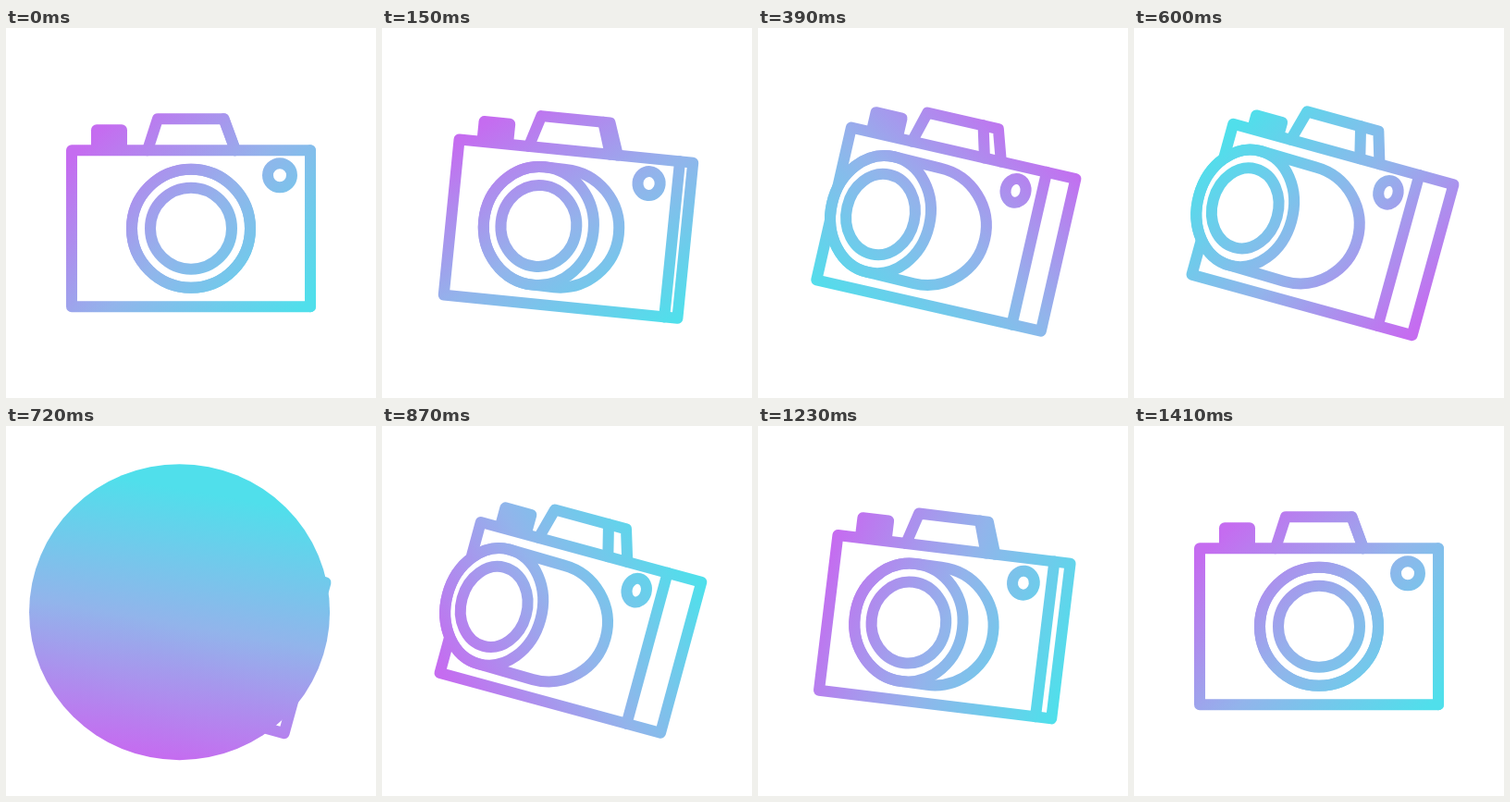
These frames come from a looping animation (400 by 400 pixels, 3470 ms). An HTML page with a canvas:

```html
<!DOCTYPE html>
<html>
<head>
<meta charset="utf-8">
<style>
html, body { margin: 0; width: 100%; height: 100%; overflow: hidden; background: #fff; }
canvas { display: block; width: 400px; height: 400px; }
</style>
</head>
<body>
<canvas id="stage" width="400" height="400"></canvas>
<script>
const ctx = document.getElementById('stage').getContext('2d');
const LOOP = 3470, STEP = 30, END = 1410;
const RAD = Math.PI / 180, TAU = Math.PI * 2;
const mix = (a, b, k) => a + (b - a) * k;
const clamp = x => Math.min(1, Math.max(0, x));

// [time, direction of the cyan end in degrees]
const SPIN = [[0, 45], [240, 75], [600, 225], [720, 280], [870, 330], [1110, 365], [1410, 405]];

// Smooth curve through the key points
function spinAt(t) {
  const slope = i => {
    const a = SPIN[Math.max(0, i - 1)], b = SPIN[Math.min(SPIN.length - 1, i + 1)];
    return (b[1] - a[1]) / (b[0] - a[0]);
  };
  let i = 0;
  while (i < SPIN.length - 2 && t > SPIN[i + 1][0]) i++;
  const [t0, v0] = SPIN[i], [t1, v1] = SPIN[i + 1];
  const d = t1 - t0, u = (t - t0) / d, w = 1 - u;
  return v0 * (1 + 2 * u) * w * w + slope(i) * d * u * w * w
       + v1 * u * u * (3 - 2 * u) - slope(i + 1) * d * u * u * w;
}

// 0 = facing front, 1 = turned aside
function turnAt(t) {
  return t < 700 ? Math.sin(clamp(t / 620) * Math.PI / 2)
                 : Math.cos(clamp((t - 805) / 605) * Math.PI / 2);
}

function line(...pts) {
  ctx.beginPath();
  pts.forEach(([x, y]) => ctx.lineTo(x, y));
  ctx.stroke();
}

function ring(x, y, rx, ry) {
  ctx.beginPath();
  ctx.ellipse(x, y, rx, ry, 0, 0, TAU);
  ctx.stroke();
}

function draw(t) {
  const p = turnAt(t), tilt = 15.4 * p, squash = 1 - 0.19 * p;
  ctx.setTransform(1, 0, 0, 1, 0, 0);
  ctx.fillStyle = '#fff';
  ctx.fillRect(0, 0, 400, 400);
  ctx.translate(200 + 4 * p, 216.7 + 1.2 * p);
  ctx.rotate(tilt * RAD);

  const dir = (spinAt(t) - tilt) * RAD;
  const gx = Math.cos(dir) * 145, gy = Math.sin(dir) * 145;
  const paint = ctx.createLinearGradient(-gx, -gy, gx, gy);
  paint.addColorStop(0, '#c56cf0');
  paint.addColorStop(0.5, '#92b4eb');
  paint.addColorStop(1, '#50dfeb');
  ctx.strokeStyle = ctx.fillStyle = paint;
  ctx.lineWidth = 12;
  ctx.lineJoin = ctx.lineCap = 'round';

  // Body and its side edge
  const half = 129 - 5.5 * p, top = -84.5, edge = half - 38.5 * p;
  ctx.strokeRect(-half, top, half * 2, 169);
  line([edge, top], [edge, -top]);

  // Viewfinder
  const a = mix(-47, -59, p), b = mix(-36, -50, p);
  const c = mix(35.5, 10, p), d = mix(48, 18.5, p);
  line([a, top], [b, -118.5], [c + 20 * p, -118.5], [d + 22 * p, top]);
  line([c, -118.5], [d, top]);

  // Shutter button
  const press = 7 * Math.sin(clamp((t - 510) / 240) * Math.PI);
  ctx.beginPath();
  ctx.roundRect(-108, -112.5 + press, mix(39, 41, p), 28 - press, [6, 6, 0, 0]);
  ctx.fill();

  ring(mix(96, 57.7, p), -57.5, 13 * squash, 13);

  // Lens barrel, then its front rings
  const front = -87 * p, back = -25 * p, rx = 64 * squash;
  ctx.beginPath();
  ctx.ellipse(back, p, 64, 64, 0, -Math.PI / 2, Math.PI / 2);
  ctx.ellipse(front, 0, rx, 64, 0, Math.PI / 2, Math.PI * 1.5);
  ctx.closePath();
  ctx.fillStyle = '#fff';
  ctx.fill();
  ctx.stroke();
  ring(front, 0, rx, 64);
  ring(front, 0, 44 * squash, 44);

  // Flash bursting out of the lens
  const k = Math.sin(clamp(1 - Math.abs(t - 720) / 120) * Math.PI / 2);
  if (k > 0) {
    ctx.fillStyle = paint;
    ctx.beginPath();
    ctx.ellipse(mix(front, -20.3, k), -11.8 * k, 162.5 * k, 160 * k, -tilt * RAD, 0, TAU);
    ctx.fill();
  }
}

const start = performance.now();
function tick() {
  const t = (performance.now() - start) % LOOP;
  draw(Math.min(END, Math.floor(t / STEP) * STEP));
  requestAnimationFrame(tick);
}
tick();
</script>
</body>
</html>
```
